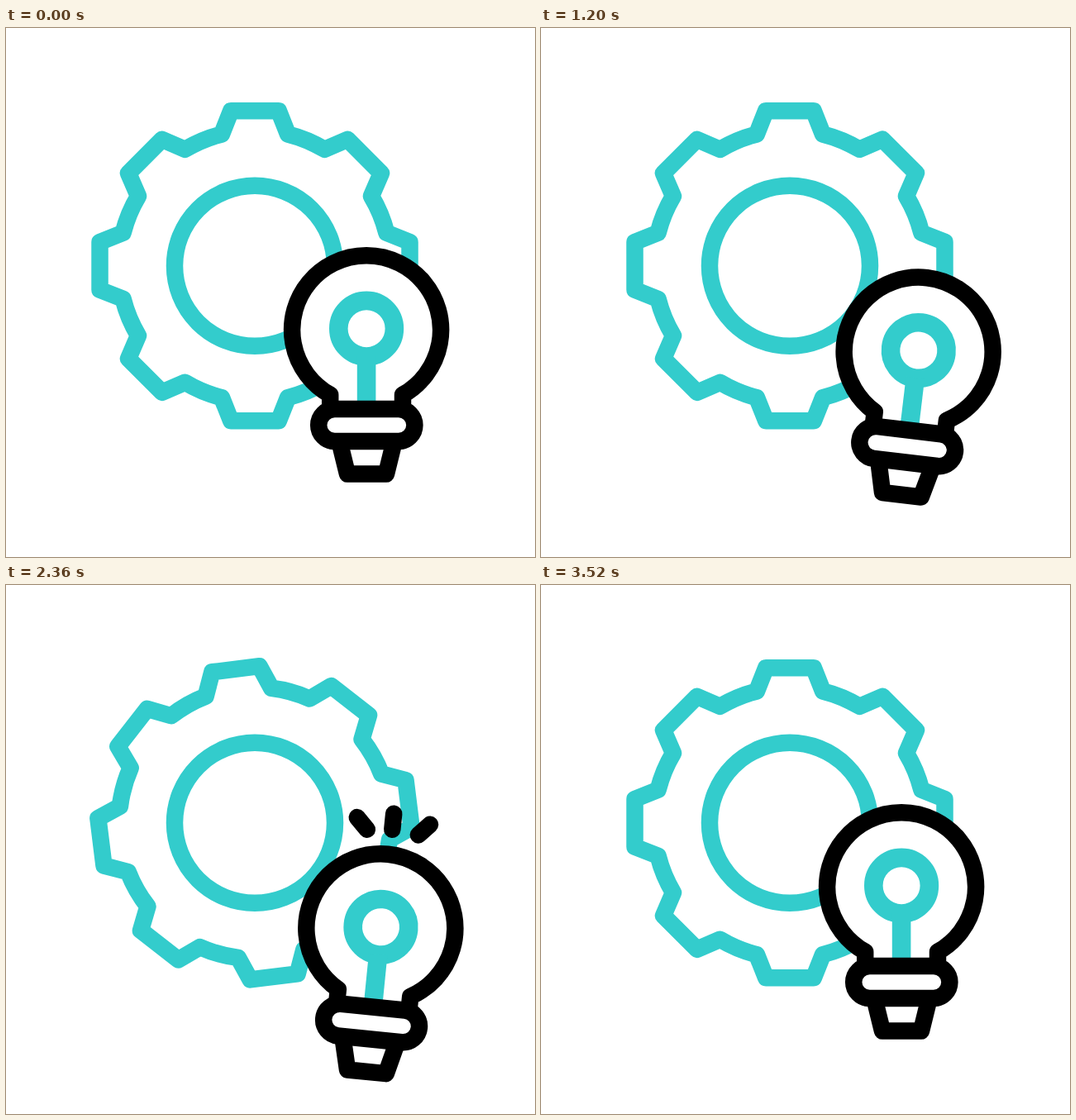
Animation of 640x640 px, one loop 3.6 s. Source, as an HTML page:

```html
<!DOCTYPE html>
<html lang="en">
<head>
<meta charset="utf-8">
<title>Gear and bulb</title>
<style>
  html, body { margin: 0; width: 100%; height: 100%; overflow: hidden; background: #fff; }
  svg { display: block; width: 100vw; height: 100vh; }
  .line { fill: none; stroke-width: 20.5; stroke-linecap: round; stroke-linejoin: round; }
  .teal { stroke: #33cccc; }
  .ink { stroke: #000; }
  .solid { fill: #fff; }
  #filament { fill: none; stroke-width: 22.6; }
</style>
</head>
<body>
<svg viewBox="0 0 640 640">
  <path id="gear" class="line teal"/>
  <circle class="line teal" cx="301" cy="287.8" r="97"/>
  <g id="bulb">
    <path class="line ink solid" d="M404 503 L413 539.6 H460 L469 503"/>
    <path class="line ink solid" d="M392.2 458 V443.8 A90 90 0 1 1 480 443.8 V458"/>
    <g id="filament">
      <circle cx="436.1" cy="363.7" r="33.8"/>
      <path d="M436.1 397 V458"/>
    </g>
    <rect class="line ink solid" x="378.2" y="461" width="116.2" height="39" rx="19.5"/>
    <g id="rays"></g>
  </g>
</svg>
<script>
const LOOP = 3600;
const CENTER = [301, 287.8];
const PIVOT = [412, 540];
const BULB = [436.1, 365.2];

// Key lists: [time in ms, value]
const GEAR_TURN = [[0, 0], [1010, -61.3], [1800, 58.3], [2575, -76], [3480, 0]];
const BULB_TILT = [[0, 0], [1005, 10], [1750, -10], [2630, 10], [3460, 0]];
const BULB_DROP = [[0, 0], [833, 46.8], [1535, 1], [2367, 46.8], [3170, 0]];

// Rays relative to the bulb centre: inner point, outer point
const RAYS = [
  [-28.3, -117.3, -67.3, -155.9],
  [2, -120.3, 2, -175.8],
  [34.1, -116.8, 71.1, -157.2]
];

const get = id => document.getElementById(id);
const clamp = x => Math.max(0, Math.min(1, x));
const ease = x => (1 - Math.cos(Math.PI * clamp(x))) / 2;

function track(keys, t) {
  for (let i = 1; i < keys.length; i++) {
    const [t0, a] = keys[i - 1], [t1, b] = keys[i];
    if (t < t1) return a + (b - a) * ease((t - t0) / (t1 - t0));
  }
  return keys[keys.length - 1][1];
}

function gearPath() {
  const at = (r, deg) => {
    const a = deg * Math.PI / 180;
    return (CENTER[0] + r * Math.sin(a)).toFixed(2) + " " +
           (CENTER[1] - r * Math.cos(a)).toFixed(2);
  };
  let d = "";
  for (let k = 0; k < 8; k++) {
    const a = k * 45;
    d += (k ? "A164.3 164.3 0 0 1 " : "M") + at(164.3, a - 14.1) +
         "L" + at(189.7, a - 8.75) + "L" + at(189.7, a + 8.75) +
         "L" + at(164.3, a + 14.1);
  }
  return d + "A164.3 164.3 0 0 1 " + at(164.3, -14.1) + "Z";
}

const gear = get("gear"), bulb = get("bulb"), filament = get("filament");
gear.setAttribute("d", gearPath());

const rays = RAYS.map(() => {
  const p = document.createElementNS("http://www.w3.org/2000/svg", "path");
  p.setAttribute("class", "line ink");
  return get("rays").appendChild(p);
});

function drawRays(t) {
  const phase = t % 1000;
  const tail = ease((phase - 600) / 400);
  const head = ease((phase - 200) / 400);
  const shown = t < 3000 && head - tail > 0.002;
  RAYS.forEach(([x0, y0, x1, y1], i) => {
    const at = k => (BULB[0] + x0 + (x1 - x0) * k).toFixed(2) + " " +
                    (BULB[1] + y0 + (y1 - y0) * k).toFixed(2);
    rays[i].setAttribute("d", shown ? `M${at(tail)}L${at(head)}` : "");
  });
}

function draw(t) {
  gear.setAttribute("transform", `rotate(${track(GEAR_TURN, t)} ${CENTER})`);
  bulb.setAttribute("transform",
    `translate(0 ${track(BULB_DROP, t)}) rotate(${track(BULB_TILT, t)} ${PIVOT})`);
  filament.setAttribute("stroke", t >= 700 && t < 900 ? "#000" : "#33cccc");
  drawRays(t);
}

let start = null;
function tick(now) {
  if (start === null) start = now;
  draw((now - start) % LOOP);
  requestAnimationFrame(tick);
}
draw(0);
requestAnimationFrame(tick);
</script>
</body>
</html>
```
